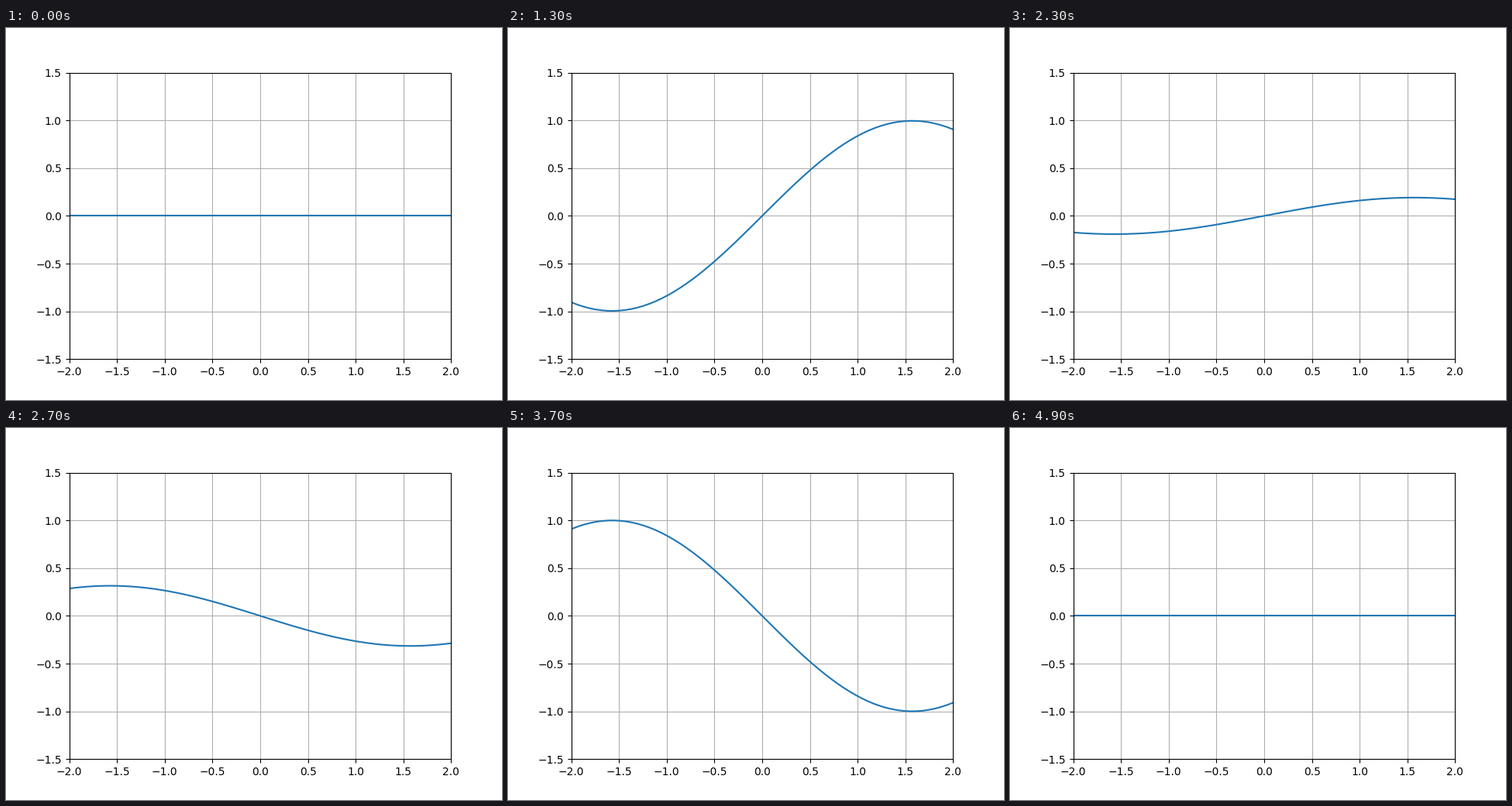
A matplotlib script for the animation above (5 s loop, 640 by 480 pixels).

```python
import matplotlib.pyplot as plt
import numpy as np
from matplotlib.animation import FuncAnimation

FRAMES = 50
INTERVAL = 100  # ms

fig, ax = plt.subplots(figsize=(6.4, 4.8), dpi=100)
ax.set_xlim(-2, 2)
ax.set_ylim(-1.5, 1.5)
ax.set_aspect("equal")
ax.grid()

x = np.linspace(-np.pi, np.pi, 100)
phases = np.linspace(0, 2 * np.pi, FRAMES)
(line,) = ax.plot(x, np.zeros_like(x), color="tab:blue", lw=1.5)


def update(frame):
    """Standing wave: a fixed sine whose amplitude swings through one period."""
    line.set_ydata(np.sin(phases[frame]) * np.sin(x))
    return (line,)


anim = FuncAnimation(fig, update, frames=FRAMES, interval=INTERVAL,
                     repeat=True, repeat_delay=0)
plt.show()
```
